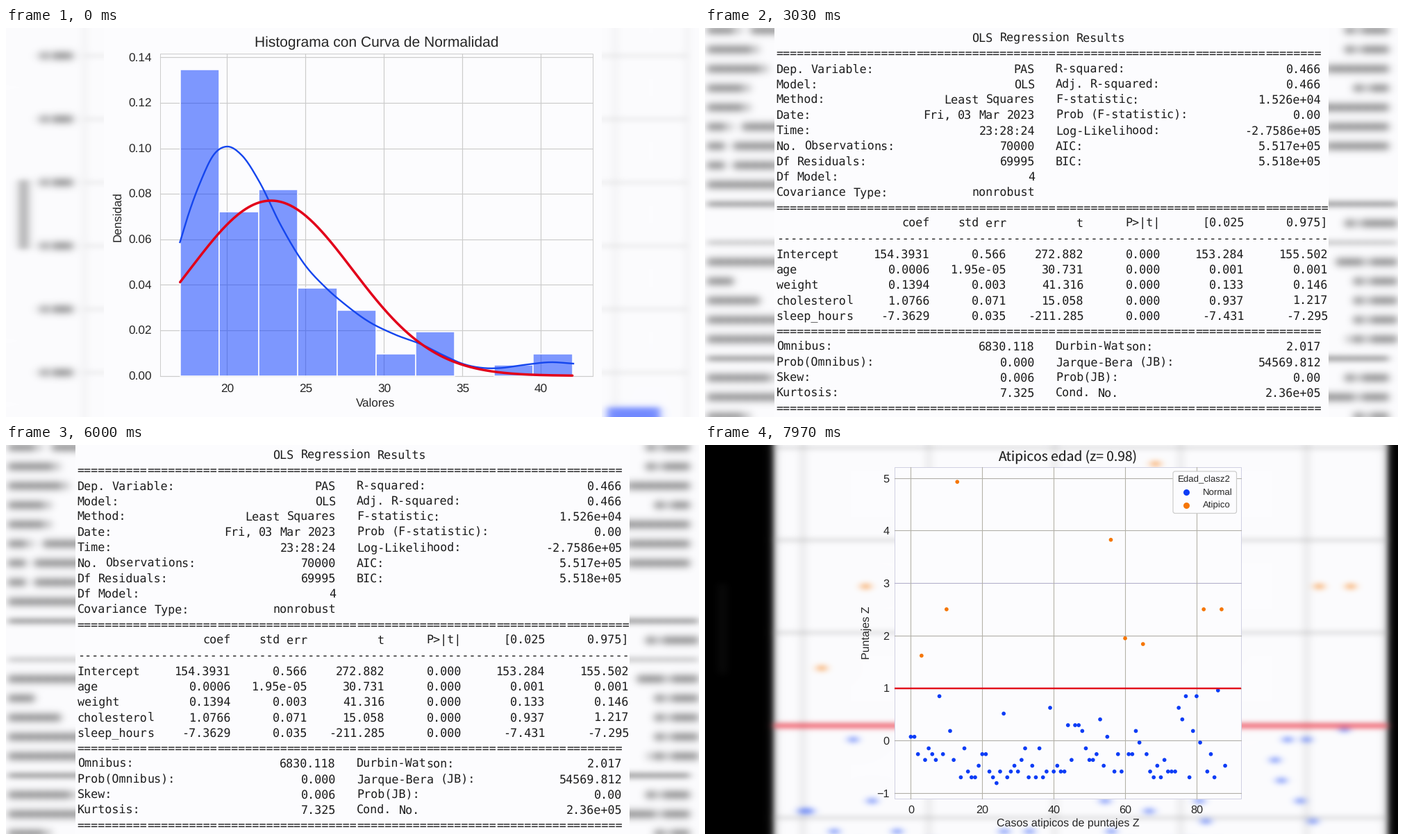
A matplotlib script that plays this animation: 998x561 px, repeating every 8000 ms.

```python
import numpy as np
import matplotlib.pyplot as plt
from matplotlib.animation import FuncAnimation
from matplotlib.patches import FancyBboxPatch, Rectangle

W, H, DPI = 998, 561, 64
PT = 72 / DPI                      # points per pixel
FRAMES, STEP = 125, 64             # 8 s loop
CUTS = (3000, 6000)

PAPER, INK = "#fcfcfe", "#262626"
BLUE, ORANGE, RED = "#0c3cf6", "#f57606", "#e2001a"

plt.rcParams["text.hinting"] = "none"
plt.rcParams["font.family"] = "Liberation Sans"

fig = plt.figure(figsize=(W / DPI, H / DPI), dpi=DPI, facecolor=PAPER)
X, Y = np.arange(W) + 0.5, np.arange(H) + 0.5


# ---- soft backdrops ----

def rgb(color):
    return np.array(plt.matplotlib.colors.to_rgb(color))


def canvas(color):
    return np.ones((H, W, 3)) * rgb(color)


def band(v, a, b, s):
    return 0.5 * (np.tanh((v - a) / s) - np.tanh((v - b) / s))


def bump(v, c, s):
    return np.exp(-0.5 * ((v - c) / s) ** 2)


def blend(img, px, py, color, alpha=1.0):
    cover = np.clip(alpha * np.outer(py, px), 0, 1)[..., None]
    img += cover * (rgb(color) - img)


def zoom(v, mid, k):
    return mid + (v - mid) * k


# ---- drawing helpers, all in stage pixels ----

def slide(img):
    ax = fig.add_axes([0, 0, 1, 1])
    ax.imshow(img, extent=(0, W, H, 0), aspect="auto", interpolation="nearest")
    ax.set(xlim=(0, W), ylim=(H, 0))
    ax.axis("off")
    return ax


def label(ax, x, y, s, px, ha="center", **kw):
    ax.text(x, y, s, size=px * PT, ha=ha, va="baseline",
            color=kw.pop("color", INK), rotation_mode="anchor", **kw)


def line(ax, xs, ys, color, px=1.0, **kw):
    ax.plot(xs, ys, color=color, lw=px * PT, **kw)


def frame_box(ax, x0, y0, x1, y1, color, face="none", z=1):
    ax.add_patch(Rectangle((x0, y0), x1 - x0, y1 - y0, fc=face, ec=color,
                           lw=PT, zorder=z))


def smooth(points, n=300):
    """Cubic Hermite curve through the points."""
    x, y = np.array(points, float).T
    m = np.gradient(y, x)
    t = np.linspace(x[0], x[-1], n)
    k = np.clip(np.searchsorted(x, t, "right") - 1, 0, len(x) - 2)
    h = x[k + 1] - x[k]
    u = (t - x[k]) / h
    v = ((1 + 2 * u) * (1 - u) ** 2 * y[k] + u * (1 - u) ** 2 * h * m[k]
         + u * u * (3 - 2 * u) * y[k + 1] + u * u * (u - 1) * h * m[k + 1])
    return t, v


# ---- slide 1: histogram ----

def histogram():
    left, right, top, base = 222, 845, 37, 501.5
    unit, dens = 22.6, 65.6 / 0.02
    px = lambda v: 318.5 + (v - 20) * unit
    py = lambda d: base - d * dens
    ticks = [0.02 * k for k in range(8)]

    bx = lambda v: zoom(v, 499, 1.393)
    by = lambda v: zoom(v, 280.5, 1.393)
    img = canvas(PAPER)
    for d in ticks:
        y = by(py(d))
        blend(img, band(X, bx(left), bx(right), 6), bump(Y, y, 4), "#bbbbbb", 0.13)
        for x0, x1, a in ((48, 63, 0.3), (67, 96, 0.36)):
            blend(img, band(X, x0, x1, 8), bump(Y, y, 6), INK, a)
    for x in (left, px(40), right):
        blend(img, bump(X, bx(x), 6), np.ones(H), "#bbbbbb", 0.08)
    blend(img, bump(X, 25.5, 7.5), band(Y, 219, 319, 5), INK, 0.28)
    blend(img, band(X, 866, 942, 7), band(Y, 547, 640, 5), "#7088ff")
    img[:, 141:858] = rgb(PAPER)

    ax = slide(img)
    for d in ticks:
        line(ax, [left, right], [py(d)] * 2, "#cccccc", 1.2, zorder=1)
        label(ax, 209.5, py(d) + 6.2, f"{d:.2f}", 17.2, ha="right")
    for v in range(20, 41, 5):
        line(ax, [px(v)] * 2, [top, base], "#cccccc", 1.2, zorder=1)
        label(ax, px(v), 525.5, str(v), 17.2)
    frame_box(ax, left, top, right, base, "#cccccc")

    counts = (28, 15, 17, 8, 6, 2, 4, 0, 1, 2)
    for k, n in enumerate(counts):
        if n:
            y = py(n * 0.1347 / 28)
            x0, x1 = px(17 + 2.5 * k), px(19.5 + 2.5 * k)
            ax.add_patch(Rectangle((x0, y), x1 - x0, base - y, fc=(0, 0.2, 1, 0.5),
                                   ec="#fcfcfe", lw=1.6 * PT, zorder=2))

    kde = [(250.5, 309), (263, 268), (280, 222), (299, 183), (318, 171),
           (340, 184), (365, 222), (395, 283), (430, 341), (460, 374),
           (490, 400), (520, 422), (560, 442), (600, 457), (630, 472),
           (660, 485), (690, 490.5), (710, 490.5), (745, 486), (785, 482),
           (817, 484)]
    line(ax, *smooth(kde), "#1546ee", 2.4, zorder=3)
    v = np.linspace(17, 42, 300)
    line(ax, px(v), py(0.077 * np.exp(-0.5 * ((v - 22.8) / 5.18) ** 2)),
         RED, 3.5, zorder=4, solid_capstyle="round")

    label(ax, 534, 26.3, "Histograma con Curva de Normalidad", 21)
    label(ax, 532, 546.3, "Valores", 17)
    label(ax, 165.3, 272.5, "Densidad", 17, rotation=90)
    return ax


# ---- slide 2: regression table ----

SUMMARY = [
    ("Dep. Variable:", "PAS", "R-squared:", "0.466"),
    ("Model:", "OLS", "Adj. R-squared:", "0.466"),
    ("Method:", "Least Squares", "F-statistic:", "1.526e+04"),
    ("Date:", "Fri, 03 Mar 2023", "Prob (F-statistic):", "0.00"),
    ("Time:", "23:28:24", "Log-Likelihood:", "-2.7586e+05"),
    ("No. Observations:", "70000", "AIC:", "5.517e+05"),
    ("Df Residuals:", "69995", "BIC:", "5.518e+05"),
    ("Df Model:", "4", "", ""),
    ("Covariance Type:", "nonrobust", "", ""),
]
COEFS = [
    ("Intercept", "154.3931", "0.566", "272.882", "0.000", "153.284", "155.502"),
    ("age", "0.0006", "1.95e-05", "30.731", "0.000", "0.001", "0.001"),
    ("weight", "0.1394", "0.003", "41.316", "0.000", "0.133", "0.146"),
    ("cholesterol", "1.0766", "0.071", "15.058", "0.000", "0.937", "1.217"),
    ("sleep_hours", "-7.3629", "0.035", "-211.285", "0.000", "-7.431", "-7.295"),
]
TESTS = [
    ("Omnibus:", "6830.118", "Durbin-Watson:", "2.017"),
    ("Prob(Omnibus):", "0.000", "Jarque-Bera (JB):", "54569.812"),
    ("Skew:", "0.006", "Prob(JB):", "0.00"),
    ("Kurtosis:", "7.325", "Cond. No.", "2.36e+05"),
]


def table_rows():
    pair = "{:<18}{:>19}   {:<19}{:>19}"
    coef = "{:<11}{:>11}{:>11}{:>11}{:>11}{:>12}{:>12}"
    head = ("", "coef", "std err", "t", "P>|t|", "[0.025", "0.975]")
    return (["OLS Regression Results".center(78), "=" * 78]
            + [pair.format(*r) for r in SUMMARY]
            + ["=" * 79, coef.format(*head), "-" * 79]
            + [coef.format(*r) for r in COEFS]
            + ["=" * 78]
            + [pair.format(*r) for r in TESTS]
            + ["=" * 78])


def pieces(row, limit=10):
    """Split a row into (column, text) runs so columns stay on the grid."""
    col = 0
    while col < len(row):
        if row[col] == " ":
            col += 1
            continue
        run = row[col:col + limit].split(" ")[0]
        yield col, run
        col += len(run)


def regression():
    x0, pitch, y0, lead = 102.6, 10.06, 14.2, 22.27
    rows = table_rows()
    k = W / 798
    weight = {"=": 0.2, "-": 0.1, ".": 0.1, ":": 0.12, ",": 0.1}

    img = canvas(PAPER)
    for r, row in enumerate(rows):
        prof = np.zeros(W)
        for c, ch in enumerate(row):
            if ch != " ":
                x = zoom(x0 + (c + 0.5) * pitch, 499, k)
                prof += weight.get(ch, 0.24) * bump(X, x, 7)
        s = 4.5 if set(row) <= {"=", "-"} else 6
        blend(img, prof, bump(Y, zoom(y0 + r * lead, 280.5, k), s), "#101010")
    img[:, 100:898] = rgb(PAPER)

    ax = slide(img)
    for r, row in enumerate(rows):
        for col, run in pieces(row):
            label(ax, x0 + col * pitch, y0 + r * lead + 5.6, run, pitch / 0.602,
                  ha="left", family="DejaVu Sans Mono", color="#1c1c1c")
    return ax


# ---- slide 3: outliers ----

AGES = [25, 25, 22, 39, 21, 23, 22, 21, 32, 22, 47, 26, 21, 69, 18, 23, 19, 18,
        18, 20, 22, 22, 19, 18, 17, 19, 29, 18, 19, 20, 19, 21, 23, 18, 20, 18,
        23, 18, 19, 30, 19, 20, 19, 19, 27, 21, 27, 27, 26, 23, 21, 21, 22, 28,
        20, 25, 59, 19, 22, 19, 42, 22, 22, 26, 24, 41, 22, 19, 18, 20, 18, 21,
        19, 19, 19, 30, 28, 32, 18, 26, 32, 24, 47, 19, 22, 18, 33, 47, 20]


def outliers():
    left, right, top, bottom = 273.5, 772, 31.5, 510
    px = lambda i: 296.4 + 5.144 * i
    py = lambda z: 426.2 - 75.7 * z
    cut = 351
    ages = np.array(AGES)
    dx, dy = px(np.arange(len(ages))), 487.6 - 8.355 * (ages - 17)
    colors = np.where(ages > 33, ORANGE, BLUE)

    bx = lambda v: 231 + (v - 347.5) * 1.763
    by = lambda v: 204 + (v - 237) * 1.763
    lit = band(X, 99, 983, 6)
    img = canvas("black")
    blend(img, bump(X, 25, 7), band(Y, 200, 330, 6), "white", 0.03)
    blend(img, lit, np.ones(H), PAPER)
    for z in range(-1, 6):
        blend(img, lit, bump(Y, by(py(z)), 4), "#888888", 0.14)
    for v in range(0, 81, 20):
        blend(img, bump(X, bx(px(v)), 6), np.ones(H), "#888888", 0.1)
    for x, y, c in zip(bx(dx), by(dy), colors):
        if -20 < y < H + 20:
            blend(img, bump(X, x, 7), bump(Y, y, 4.4), c,
                  0.32 if c == ORANGE else 0.29)
    blend(img, lit, bump(Y, by(cut), 4.2), "#ff0a1e", 0.4)

    ax = slide(img)
    frame_box(ax, left, top, right, bottom, "#d0d0e2", PAPER)
    for z in range(-1, 6):
        line(ax, [left, right], [py(z)] * 2, "#b4b0cc" if z == 3 else "#b0aea8",
             1.1, zorder=2)
        label(ax, 265.5, py(z) + 5.8, str(z).replace("-", "\u2212"), 16.2, ha="right")
    for v in range(0, 81, 20):
        line(ax, [px(v)] * 2, [top, bottom], "#b4b2a8", 1.1, zorder=2)
        label(ax, px(v), 530.5, str(v), 16.2)
    ax.scatter(dx, dy, s=(5.7 * PT) ** 2, c=list(colors), lw=0, zorder=3)
    line(ax, [left, right], [cut] * 2, RED, 2.4, zorder=4, solid_capstyle="butt")

    ax.add_patch(FancyBboxPatch((677, 41), 85.5, 54.5, fc=PAPER, ec="#cccccc",
                                boxstyle="round,pad=3,rounding_size=3",
                                lw=1.2 * PT, zorder=5))
    label(ax, 719.3, 53, "Edad_clasz2", 13.2, zorder=6)
    for y, name, c in ((67.7, "Normal", BLUE), (86.6, "Atipico", ORANGE)):
        ax.scatter([693.3], [y], s=(9 * PT) ** 2, c=c, lw=0, zorder=6)
        label(ax, 717, y + 3.7, name, 13.2, ha="left", zorder=6)

    label(ax, 522, 23.3, "Atipicos edad (z= 0.98)", 19.2, family="Noto Sans CJK JP")
    label(ax, 523, 550, "Casos atipicos de puntajes Z", 16)
    label(ax, 236.8, 271, "Puntajes Z", 16, rotation=90)
    return ax


slides = [histogram(), regression(), outliers()]


def update(i):
    now = sum(i * STEP >= c for c in CUTS)
    for k, ax in enumerate(slides):
        ax.set_visible(k == now)
    return slides


anim = FuncAnimation(fig, update, frames=FRAMES, interval=STEP,
                     repeat=True, repeat_delay=0, blit=False)
plt.show()
```
